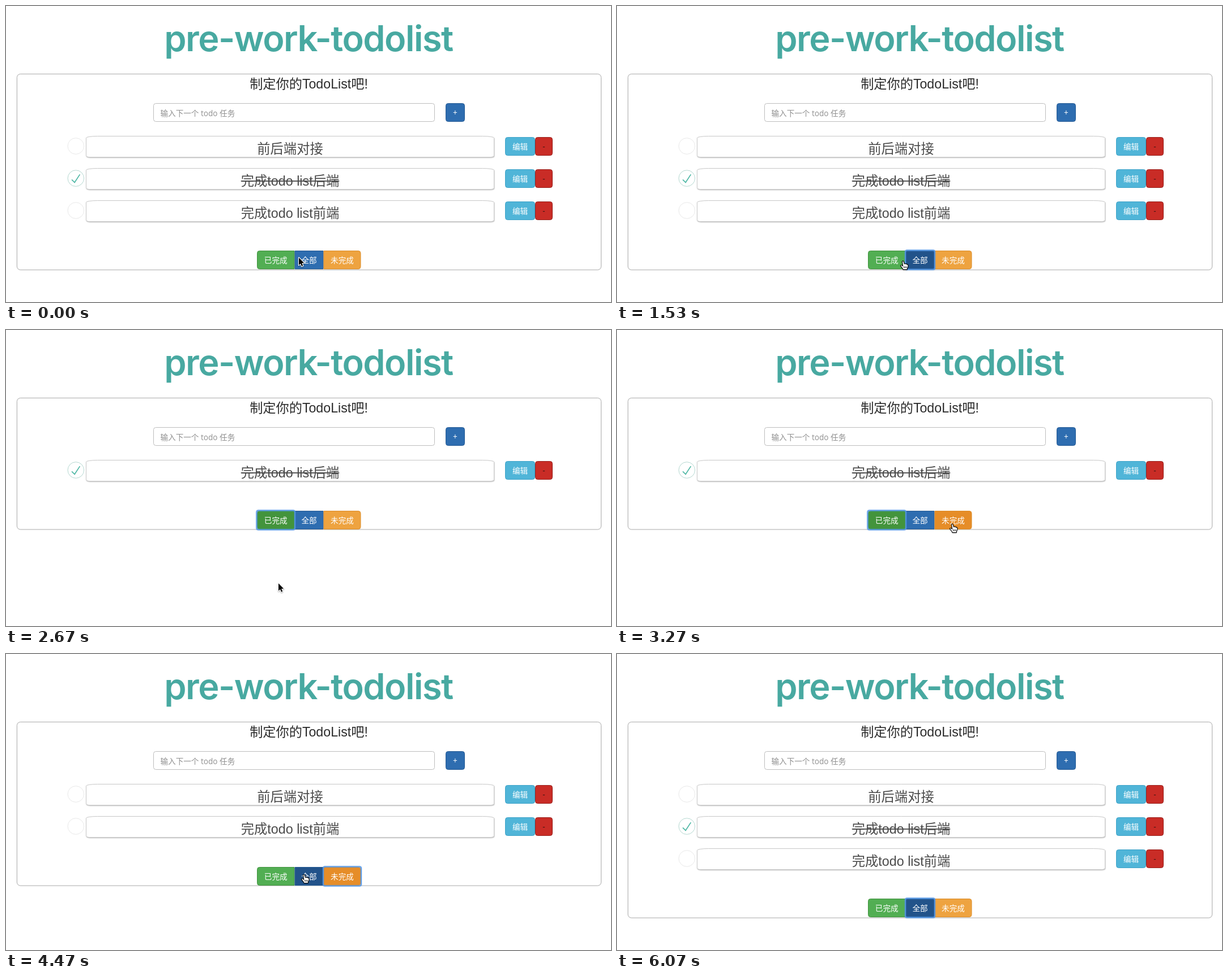
These frames come from a looping animation (1068x524 px, 6.14 s). An HTML page with a canvas:

```html
<!DOCTYPE html>
<html lang="zh">
<head>
<meta charset="utf-8">
<title>pre-work-todolist</title>
<style>
  html, body { margin: 0; width: 100%; height: 100%; overflow: hidden; background: #fff; }
  h1 {
    position: absolute; left: 0; top: 25.6px; width: 1068px; margin: 0;
    font: 600 63px/63px Inter, Roboto, sans-serif;
    font-optical-sizing: none; letter-spacing: -1.5px;
    text-align: center; white-space: nowrap; color: #48a9a1;
  }
  canvas { position: absolute; left: 0; top: 0; display: block; }
</style>
</head>
<body>
<h1>pre-work-todolist</h1>
<canvas id="stage" width="1068" height="524"></canvas>
<script>
const ctx = document.getElementById('stage').getContext('2d');
const LOOP = 6140;
const PITCH = 56.8;
const BODY = '"Liberation Sans", "Noto Sans CJK SC", "Noto Sans CJK", sans-serif';
const SMALL = '13.6px "Open Sans", "Noto Sans CJK SC", "Noto Sans CJK", sans-serif';

const TASKS = [
  { text: '前后端对接', done: false },
  { text: '完成todo list后端', done: true },
  { text: '完成todo list前端', done: false }
];

// [normal, hovered or focused, border]
const SKIN = {
  green:  ['#52ae53', '#43943c', '#42933f'],
  blue:   ['#2e6db0', '#22538a', '#255a94'],
  orange: ['#eea340', '#e68d28', '#dc8c28'],
  info:   ['#50b5d8', '#3aa0cd', '#3fa3c8'],
  red:    ['#c92c26', '#a9241f', '#98231f']
};

// pointer path: time, x, y
const PATH = [
  [0, 516, 445], [70, 516, 446], [340, 541, 474], [680, 536, 452],
  [1330, 536, 452], [1530, 505, 451], [1780, 480, 448],
  [2670, 480, 448], [3230, 592, 343], [4000, 592, 343],
  [4480, 526, 390], [4960, 526, 390], [5320, 556, 270], [5900, 580, 64]
];
const HIDE = 5900;

// clicks that change the filter or the focus
const EVENTS = [
  [0, 'all', ''], [130, 'all', 'edit0'], [1150, 'all', 'all'],
  [2200, 'done', 'done'], [3530, 'open', 'open'], [4800, 'all', 'all']
];

function pointerAt(t) {
  let i = 0;
  while (i < PATH.length - 2 && t >= PATH[i + 1][0]) i++;
  const [t0, x0, y0] = PATH[i], [t1, x1, y1] = PATH[i + 1];
  const k = Math.min(1, Math.max(0, (t - t0) / (t1 - t0)));
  const e = k * k * (3 - 2 * k);
  return { x: x0 + (x1 - x0) * e, y: y0 + (y1 - y0) * e };
}

function box(x, y, w, h, r, fill, line, width = 1) {
  ctx.beginPath();
  ctx.roundRect(x, y, w, h, r);
  if (fill) { ctx.fillStyle = fill; ctx.fill(); }
  if (line) { ctx.strokeStyle = line; ctx.lineWidth = width; ctx.stroke(); }
}

function shade(color, blur, dx = 0, dy = 0) {
  ctx.shadowColor = color;
  ctx.shadowBlur = blur;
  ctx.shadowOffsetX = dx;
  ctx.shadowOffsetY = dy;
}

function label(str, x, y, font, color, align = 'center') {
  ctx.font = font;
  ctx.fillStyle = color;
  ctx.textAlign = align;
  ctx.fillText(str, x, y);
  return ctx.measureText(str).width;
}

function buttonsFor(tasks) {
  const list = [{ id: 'add', x: 776, y: 172, w: 34, text: '+', skin: 'blue', r: 4 }];
  tasks.forEach((_, i) => {
    const y = Math.round(232 + i * PITCH);
    list.push({ id: 'edit' + i, x: 881, y, w: 53, text: '编辑', skin: 'info', r: 4 });
    list.push({ id: 'del' + i, x: 934, y, w: 31, text: '-', skin: 'red', r: 4, ink: '#3c1512' });
  });
  const y = Math.round(433.4 - (3 - tasks.length) * PITCH);
  list.push({ id: 'done', x: 443, y, w: 66.5, text: '已完成', skin: 'green', r: [4, 0, 0, 4] });
  list.push({ id: 'all', x: 509.5, y, w: 51, text: '全部', skin: 'blue', r: 0 });
  list.push({ id: 'open', x: 560.5, y, w: 66, text: '未完成', skin: 'orange', r: [0, 4, 4, 0] });
  return list;
}

function hit(list, p) {
  return list.find(b => p.x >= b.x && p.x < b.x + b.w && p.y >= b.y && p.y < b.y + 33);
}

function drawButton(b, lit) {
  const [base, dark, line] = SKIN[b.skin];
  box(b.x + .5, b.y + .5, b.w - 1, 32, b.r, lit ? dark : base, line);
  label(b.text, b.x + b.w / 2, b.y + 21.5, SMALL, b.ink || '#fff');
}

function drawRow(task, i) {
  const y = Math.round(230 + i * PITCH);
  const cy = y + 18;

  ctx.beginPath();
  ctx.arc(123.3, cy, 14.3, 0, 7);
  ctx.strokeStyle = task.done ? '#b5d8d1' : '#e9e9e9';
  ctx.lineWidth = 1;
  ctx.stroke();
  if (task.done) {
    ctx.beginPath();
    [[22, -25], [-8, 21], [-23, 6], [-27, 10], [-7, 30], [27, -22]]
      .forEach(([a, b]) => ctx.lineTo(123.3 + a * .29, cy + b * .29));
    ctx.fillStyle = '#4fb8a5';
    ctx.fill();
  }

  const wide = { x: 20, y: 3 }, tight = { x: 6, y: 2.5 };
  const corners = [wide, wide, tight, tight];
  shade('rgba(0,0,0,.4)', 2, .5, 1);
  box(141.5, y + .5, 720, 37, corners, '#fff');
  shade('transparent', 0);
  box(141.5, y + .5, 720, 37, corners, null, '#c9c9c9');

  const w = label(task.text, 501.5, y + 30.5, '23.3px ' + BODY, '#4a4a4a');
  if (task.done) {
    ctx.fillStyle = '#4a4a4a';
    ctx.fillRect(501.5 - w / 2, y + 22, w, 1.8);
  }
}

function drawArrow(x, y) {
  ctx.save();
  ctx.translate(x + 1, y + .5);
  ctx.beginPath();
  [[0, 0], [0, 13.2], [3, 10.4], [5.1, 15.2], [7.2, 14.3], [5.2, 9.5], [9.2, 9.4]]
    .forEach(p => ctx.lineTo(...p));
  ctx.closePath();
  ctx.lineJoin = 'round';
  shade('rgba(0,0,0,.35)', 2, 0, 1);
  ctx.strokeStyle = '#fff';
  ctx.lineWidth = 2.4;
  ctx.stroke();
  shade('transparent', 0);
  ctx.fillStyle = '#000';
  ctx.fill();
  ctx.restore();
}

function drawHand(x, y) {
  ctx.save();
  ctx.translate(x, y);
  ctx.beginPath();
  ctx.moveTo(-1.6, 1.4);
  ctx.quadraticCurveTo(-.8, -.6, 1, 1);
  ctx.lineTo(2.4, 5.6);
  ctx.quadraticCurveTo(4, 4.2, 5, 5.8);
  ctx.quadraticCurveTo(6.6, 5, 7.2, 6.7);
  ctx.quadraticCurveTo(9, 6.2, 9, 8.4);
  ctx.quadraticCurveTo(9.2, 11.5, 7.5, 13.3);
  ctx.lineTo(7.3, 15.6);
  ctx.lineTo(0, 15.6);
  ctx.quadraticCurveTo(-.6, 13.4, -2.8, 11.2);
  ctx.quadraticCurveTo(-5.4, 8.2, -3.6, 7.8);
  ctx.quadraticCurveTo(-2, 7.6, -.3, 9.4);
  ctx.closePath();
  ctx.lineJoin = 'round';
  shade('rgba(0,0,0,.3)', 2, 0, 1);
  ctx.fillStyle = '#fff';
  ctx.fill();
  shade('transparent', 0);
  ctx.strokeStyle = '#000';
  ctx.lineWidth = 1.1;
  ctx.stroke();
  ctx.beginPath();
  for (const a of [1.6, 3.8, 6]) {
    ctx.moveTo(a, 10);
    ctx.lineTo(a + .1, 13);
  }
  ctx.lineWidth = .9;
  ctx.stroke();
  ctx.restore();
}

function draw(t) {
  const [, filter, focus] = EVENTS.filter(e => e[0] <= t).pop();
  const tasks = TASKS.filter(k => filter === 'all' || k.done === (filter === 'done'));
  const buttons = buttonsFor(tasks);
  const p = pointerAt(t);
  const live = t > 130 && t < HIDE;
  const over = live && hit(buttons, p);
  const lit = live && hit(buttons, pointerAt(t - 70));

  ctx.clearRect(0, 0, 1068, 524);
  const bottom = Math.round(466.6 - (3 - tasks.length) * PITCH);
  shade('rgba(0,0,0,.3)', 2);
  box(19.5, 120.5, 1031, bottom - 120.5, 6, '#fff');
  shade('transparent', 0);
  box(19.5, 120.5, 1031, bottom - 120.5, 6, null, '#b4b4b4');
  label('制定你的TodoList吧!', 534.5, 146, '23.2px ' + BODY, '#2b2b2b');

  box(260.5, 172.5, 496, 32, 4, '#fff', '#bdbdbd');
  label('输入下一个 todo 任务', 272.5, 194.5, SMALL, '#8f8f8f', 'left');

  tasks.forEach(drawRow);
  buttons.forEach(b => drawButton(b, b.id === focus || b === lit));

  const f = buttons.find(b => b.id === focus);
  if (f) {
    shade('rgba(80,150,240,.8)', 2);
    box(f.x - .5, f.y - .5, f.w + 1, 34, 3, null, 'rgba(82,148,226,.85)', 2);
    shade('transparent', 0);
  }

  if (t < HIDE) (over ? drawHand : drawArrow)(p.x, p.y);
}

function tick() {
  draw(performance.now() % LOOP);
  requestAnimationFrame(tick);
}
tick();
</script>
</body>
</html>
```
